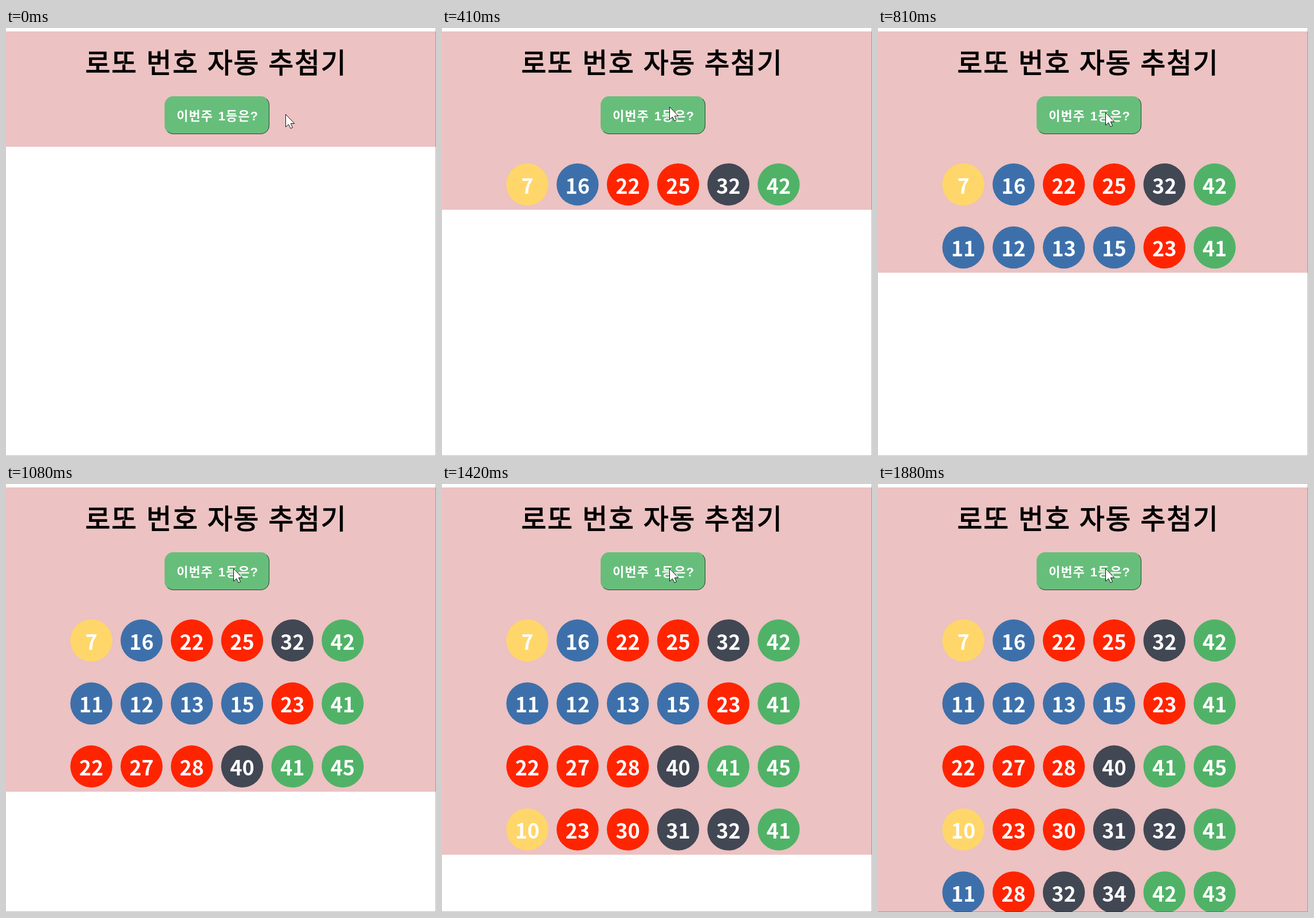
An HTML page that plays this animation: 751x746 px, repeating every 2.28 s.

```html
<!DOCTYPE html>
<html lang="ko">
<head>
<meta charset="utf-8">
<style>
  html, body { margin: 0; height: 100%; overflow: hidden; background: #fff; }
  svg { display: block; width: 751px; height: 746px; }
  text { font-family: "Noto Sans CJK KR", "Noto Sans CJK", sans-serif; font-weight: bold; }
  .title { font-size: 47.5px; font-weight: normal; letter-spacing: 2px; stroke: #000; stroke-width: 1.3px; }
  .label { font: bold 22px "Liberation Sans", "Noto Sans CJK KR", "Noto Sans CJK", sans-serif; letter-spacing: 1px; word-spacing: 2px; fill: #fff; }
  .ball { font-size: 36px; text-anchor: middle; fill: #fff; }
</style>
</head>
<body>
<svg viewBox="0 0 751 746">
  <rect id="panel" y="6" width="751" fill="#ecc2c2"/>
  <text class="title" x="138.5" y="77.5">로또 번호 자동 추첨기</text>
  <rect x="277" y="119" width="183" height="66" rx="15" fill="#67be7b"/>
  <path id="bevel" fill="none" stroke="#343c37"
    d="M281.75 180.25A14.5 14.5 0 0 0 292 184.5H445A14.5 14.5 0 0 0 459.5 170V134A14.5 14.5 0 0 0 455.25 123.75"/>
  <text class="label" x="298" y="160.5">이번주 1등은?</text>
  <g id="rows"></g>
  <g id="pointer">
    <path d="M.5 .5V22.5L5.5 18L9 25L12.5 23.5L9.3 16.5H15.8Z" fill="#fff" stroke="#111"/>
    <circle id="halo" r="16.5" fill="#ff0" fill-opacity=".5"/>
  </g>
  <path d="M750.5 0V745.5H0" fill="none" stroke="#000" stroke-opacity=".25"/>
</svg>
<script>
const LOOP = 2280;
const ROW_STEP = 109.8;
const COLORS = ['#ffd669', '#3d70ab', '#ff2400', '#424754', '#50b267'];

// Each click draws one row of numbers when the button is released.
const draws = [
  { press: 340, release: 410, numbers: [7, 16, 22, 25, 32, 42] },
  { press: 740, release: 810, numbers: [11, 12, 13, 15, 23, 41] },
  { press: 1010, release: 1080, numbers: [22, 27, 28, 40, 41, 45] },
  { press: 1350, release: 1420, numbers: [10, 23, 30, 31, 32, 41] },
  { press: 1750, release: 1880, numbers: [11, 28, 32, 34, 42, 43] }
];

// Pointer positions as [time, x, y], held until the next one.
const pointerPath = [
  [0, 488, 150], [130, 474, 146], [200, 438, 140], [270, 404, 137],
  [340, 397, 137], [480, 397, 142], [610, 397, 147]
];

const byId = id => document.getElementById(id);
const [panel, bevel, rows, pointer, halo] =
  ['panel', 'bevel', 'rows', 'pointer', 'halo'].map(byId);
const show = (node, visible) => node.setAttribute('visibility', visible ? 'visible' : 'hidden');

function ball(number, column, row) {
  const x = 149 + column * 87.8;
  const y = 272.7 + row * ROW_STEP;
  const color = COLORS[Math.floor((number - 1) / 10)];
  return `<circle cx="${x}" cy="${y}" r="36.7" fill="${color}"/>
    <text class="ball" x="${x}" y="${y + 15.8}">${number}</text>`;
}

rows.innerHTML = draws.map(({ numbers }, row) =>
  `<g>${numbers.map((n, column) => ball(n, column, row)).join('')}</g>`).join('');

function render(time) {
  const drawn = draws.filter(d => time >= d.release).length;
  const pressed = draws.some(d => time >= d.press && time < d.release);
  const [, x, y] = pointerPath.findLast(([start]) => time >= start);

  panel.setAttribute('height', 201 + drawn * ROW_STEP);
  [...rows.children].forEach((row, i) => show(row, i < drawn));
  bevel.setAttribute('transform', pressed ? 'rotate(180 368.5 152)' : '');
  pointer.setAttribute('transform', `translate(${x} ${y})`);
  show(halo, pressed);
}

function tick() {
  render(performance.now() % LOOP);
  requestAnimationFrame(tick);
}
tick();
</script>
</body>
</html>
```
